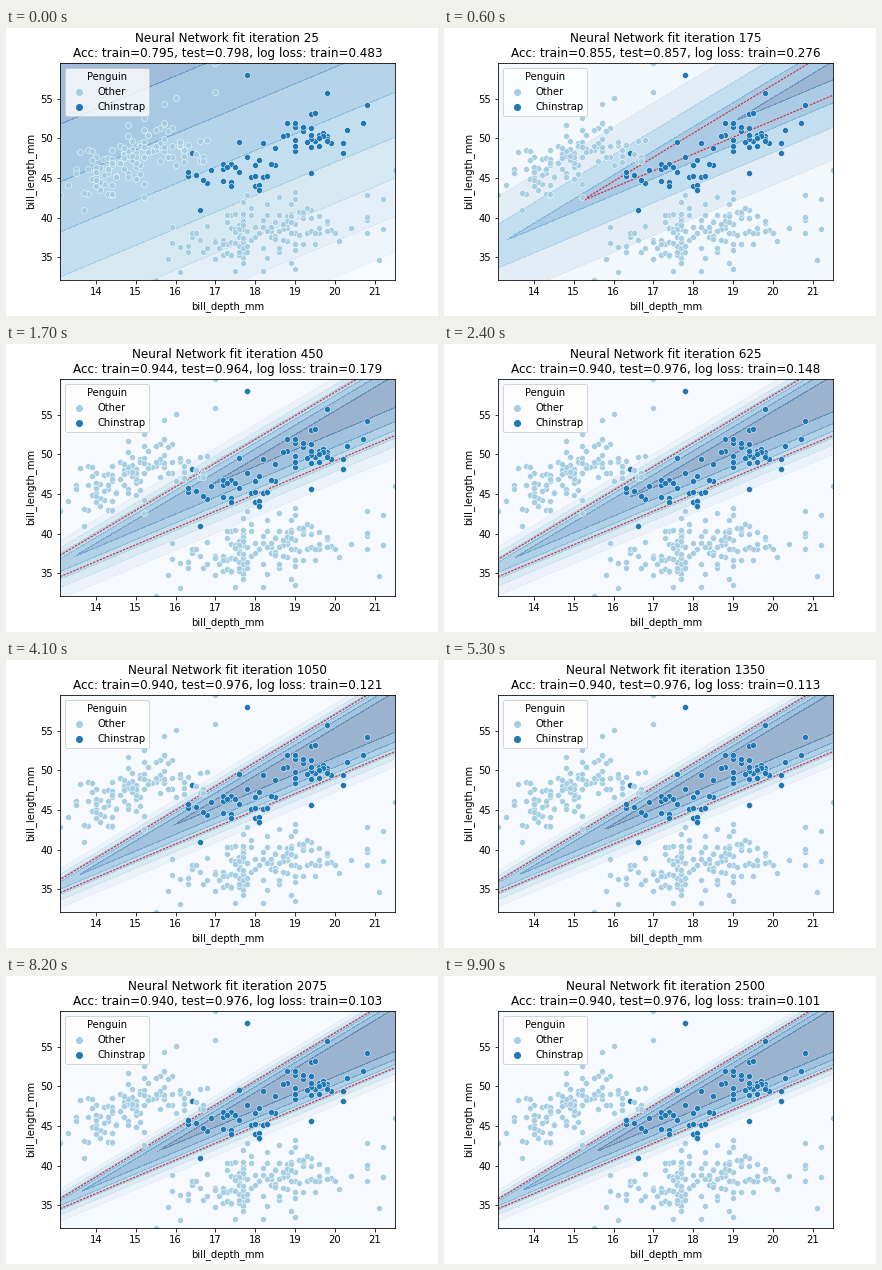
Write a matplotlib script that moves like this. It is 432 px wide and 288 px high and loops after 10 s.

```python
import numpy as np
import matplotlib.pyplot as plt
from matplotlib.animation import FuncAnimation

W, H, DPI = 432, 288, 72
FRAMES, INTERVAL, STEP = 100, 100, 25
XLIM, YLIM = (13.1, 21.5), (32.1, 59.6)
LEFT, RIGHT, TOP, BOTTOM = 54, 388.8, 34.56, 253.44
LIGHT, DARK = "#a6cee3", "#1f78b4"

# Log loss at a few iterations
LOSS_AT = [25, 325, 625, 1050, 1675, 2075, 2500]
LOSS = [0.483, 0.210, 0.148, 0.121, 0.106, 0.103, 0.101]


def cluster(n, mean, sd, strays=()):
    """Normal points cut at two deviations, rounded like measurements."""
    pts = rng.normal(mean, sd, (3 * n, 2))
    near = (np.abs(pts - mean) < 2 * np.array(sd)).all(axis=1)
    pts = pts[near][:n].round(1)
    return np.vstack([pts, *strays])


def logit(p):
    return np.log(p / (1 - p))


gx, gy = np.meshgrid(np.linspace(XLIM[0] - 1, XLIM[1] + 1, 260),
                     np.linspace(YLIM[0] - 1, YLIM[1] + 1, 260))
u = (gx - XLIM[0]) / (XLIM[1] - XLIM[0])
px = LEFT + u * (RIGHT - LEFT)
py = TOP + (YLIM[1] - gy) / (YLIM[1] - YLIM[0]) * (BOTTOM - TOP)

# Nearly untrained network: one tilted slope
drop = py + 0.42 * (px - LEFT)
slope_z = logit(np.maximum(0.4655 - 5.63e-4 * drop - 1.19e-6 * drop**2, 0.06))


def probability(it):
    """The slope turns into a wedge whose edges tighten like 1 / it."""
    s = min(1, 325 / it)
    left_y, top_x = 227 - 20 * s, 370 - 25 * s
    upper = left_y + (px - LEFT) * (TOP - left_y) / (top_x - LEFT)
    lower = 234 + u * (92 - 234)
    z = logit(0.9) * np.minimum((py - upper) / (9.5 + 13 * s),
                                (lower - py) / (13 + 21 * s))
    mix = min(1, (it - 25) / 300) ** 1.5
    return 1 / (1 + np.exp(-((1 - mix) * slope_z + mix * z)))


def caption(it):
    train = round(np.interp(it, [75, 325, 550], [198, 236, 234])) / 249
    test = round(np.interp(it, [75, 325, 550], [67, 80, 82])) / 84
    loss = np.interp(np.log(it), np.log(LOSS_AT), LOSS)
    return (f"Neural Network fit iteration {it}\n"
            f"Acc: train={train:.3f}, test={test:.3f}, log loss: train={loss:.3f}")


# Two sexes per species, plus the most isolated birds
rng = np.random.default_rng(7)
groups = [
    (cluster(70, (17.6, 37.3), (0.95, 2.0), [(19, 33.5), (21.1, 34.6), (16.1, 33.1), (15.5, 32.1)]), LIGHT),
    (cluster(68, (19.0, 40.4), (0.95, 2.2), [(21.5, 46), (21.2, 42.3), (20.8, 42.8), (21.2, 38.6)]), LIGHT),
    (cluster(28, (17.5, 46.2), (0.7, 1.9), [(17.8, 58), (16.6, 40.9), (18.1, 43.5), (16.4, 48.1)]), DARK),
    (cluster(32, (19.2, 50.8), (0.6, 1.3), [(20.8, 54.2), (19.8, 55.8), (20.7, 52), (19.4, 45.6)]), DARK),
    (cluster(58, (14.3, 45.8), (0.55, 1.9), [(13.1, 42.9), (13.7, 40.9)]), LIGHT),
    (cluster(56, (15.6, 49.2), (0.7, 1.7), [(17, 59.6), (17, 55.9), (16, 55.1), (15.7, 54.3)]), LIGHT),
]

fig = plt.figure(figsize=(W / DPI, H / DPI), dpi=DPI, facecolor="white")
ax = fig.add_axes([0.125, 0.125, 0.775, 0.755])
for pts, color in groups:
    ax.scatter(*pts.T, s=36, color=color, edgecolor="white", linewidth=0.48, zorder=2.2)
for label, color in (("Other", LIGHT), ("Chinstrap", DARK)):
    ax.scatter([], [], s=36, color=color, label=label)
ax.legend(title="Penguin", loc="upper left")
ax.set(xlim=XLIM, ylim=YLIM, xlabel="bill_depth_mm", ylabel="bill_length_mm")
title = ax.set_title(caption(STEP))
shown = []


def update(i):
    while shown:
        shown.pop().remove()
    it = STEP * (i + 1)
    p = probability(it)
    gap = 0.05 if p.max() < 0.5 else 0.15
    levels = gap * np.arange(np.floor(p.min() / gap), np.ceil(p.max() / gap) + 1)
    shown.append(ax.contourf(gx, gy, p, levels=levels, cmap="Blues", alpha=0.4))
    if p.max() > 0.5:
        shown.append(ax.contour(gx, gy, p, levels=[0.5], colors="#cc3344",
                                linewidths=1.2, linestyles=[(0, (2, 1))]))
    title.set_text(caption(it))
    return [title]


anim = FuncAnimation(fig, update, frames=FRAMES, interval=INTERVAL,
                     repeat=True, repeat_delay=0, blit=False)
plt.show()
```
